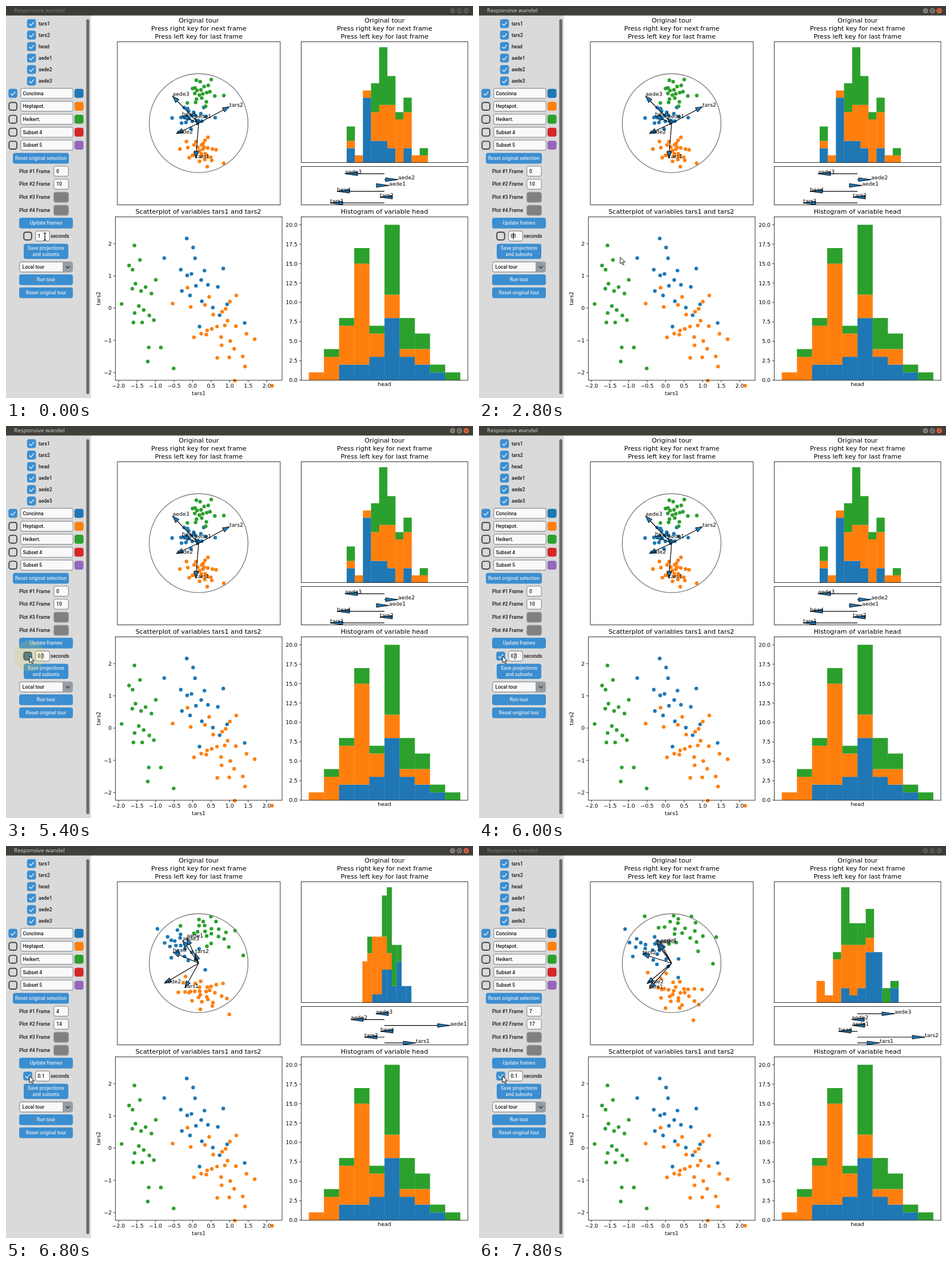
These frames come from a looping animation (817 by 685 pixels, 8000 ms). An HTML page:

```html
<!DOCTYPE html>
<html lang="en">
<head>
<meta charset="utf-8">
<title>Tour window</title>
<style>
html, body { margin: 0; width: 100%; height: 100%; overflow: hidden; background: #fff; }
svg { display: block; width: 817px; height: 685px; }
text { white-space: pre; }
.ui { font: 500 8.6px Roboto, sans-serif; fill: #1a1a1a; }
.ui.btn { fill: #dce4ee; }
.plot { font: 9.35px "DejaVu Sans", sans-serif; fill: #000; }
.plot.head { font-size: 11.2px; }
.bar { font: 9.6px "Open Sans", sans-serif; letter-spacing: .2px; }
</style>
</head>
<body>
<svg viewBox="0 0 817 685">
  <g id="fixed"></g>
  <g id="tour"></g>
  <g id="live"></g>
</svg>
<script>
const BLUE = '#1f77b4', ORANGE = '#ff7f0e', GREEN = '#2ca02c';
const COLORS = [BLUE, ORANGE, GREEN];
const SIZES = [21, 31, 22];
const ACCENT = '#3b8ed0', HOVER = '#36719f', EDGE = '#979da2';
const LOOP = 8000;
const VARS = ['tars1', 'tars2', 'head', 'aede1', 'aede2', 'aede3'];

// Per species: centre x, y, spread x, y, correlation
const SCATTER = [[341, 487, 28, 46, .5], [375, 566, 34, 43, .5], [239, 519, 20, 58, .6]];

// Bar heights per species
const HEAD_BINS = [[0,0,2,2,3,8,3,2,1,0], [1,3,5,13,3,3,1,2,0,0], [0,1,1,2,1,9,4,2,1,1]];

// Key poses; the steps between them are interpolated
const POSES = [
  { step: 0, span: [596, 738],
    clouds: [[325, 194, 15, 11, 0], [341, 254, 15, 13, .2], [343, 151, 14, 13, 0]],
    axes: [[332, 266], [391, 176], [308, 192], [330, 196], [298, 223], [291.5, 157.5]],
    tips: [567, 654, 579, 670, 686, 593],
    bins: [[2,0,9,3,3,2,0,2,0,0], [1,1,1,4,5,6,6,5,1,1], [2,0,0,4,8,4,1,2,0,1]] },
  { step: 4, span: [623.5, 709],
    clouds: [[304, 176, 18, 18, .5], [342, 256, 24, 15, .3], [359, 150, 24, 17, .5]],
    axes: [[313, 248], [331, 187], [292, 185.5], [316, 160.5], [277, 240], [309, 165]],
    tips: [717, 627, 655, 777, 603, 647],
    bins: [[0,0,1,1,4,4,2,5,2,2], [5,6,7,7,4,2,0,0,0,0], [0,2,0,0,5,8,5,2,0,0]] },
  { step: 7, span: [590.5, 734],
    clouds: [[300, 183, 24, 18, .5], [343, 256, 24, 17, .35], [357, 149, 29, 21, .5]],
    axes: [[298, 249.5], [286, 189], [311, 170], [317, 168], [294, 240.5], [314, 170]],
    tips: [701, 780, 629, 653, 652, 727],
    bins: [[0,0,0,2,1,2,7,7,0,2], [3,1,6,6,7,6,2,0,0,0], [0,0,1,8,3,3,4,0,2,1]] }
];

const $ = id => document.getElementById(id);
const range = n => [...Array(n).keys()];
const within = (t, ...spans) => spans.some(([a, b]) => t >= a && t < b);
const mix = (p, q, k) => Array.isArray(p) ? p.map((v, i) => mix(v, q[i], k)) : p + (q - p) * k;

function seeded(seed) {
  return () => (seed = (seed * 16807) % 2147483647) / 2147483647;
}

// Evenly spread normal samples as [radius, angle]
const random = seeded(4711);
const SAMPLES = SIZES.map(n => range(n).map(i =>
  [Math.sqrt(-2 * Math.log((i + .5) / n)), i * 2.4 + random()]));

const rect = (x, y, w, h, fill, more = '') =>
  `<rect x="${x}" y="${y}" width="${w}" height="${h}" fill="${fill}" ${more}/>`;
const path = (d, stroke, width, more = 'fill="none"') =>
  `<path d="${d}" stroke="${stroke}" stroke-width="${width}" ${more}/>`;
const dot = (x, y, r, fill, more = '') => `<circle cx="${x}" cy="${y}" r="${r}" fill="${fill}" ${more}/>`;
const text = (x, y, s, cls, anchor = 'start', more = '') =>
  `<text x="${x}" y="${y}" class="${cls}" text-anchor="${anchor}" ${more}>${s}</text>`;
const ui = (x, y, s) => text(x, y + 3, s, 'ui');
const frame = (x, y, w, h) => rect(x, y, w, h, 'none', 'stroke="#000" stroke-width=".8"');

const button = (x, y, w, h, lines, fill = ACCENT) => rect(x, y, w, h, fill, 'rx="4"') +
  lines.map((s, i) => text(x + w / 2, y + h / 2 + 3 + (i - (lines.length - 1) / 2) * 11.5, s,
    'ui btn', 'middle')).join('');

const entry = (x, y, w, fill = '#f9f9fa') =>
  rect(x + .7, y - 8.8, w - 1.4, 17.6, fill, `rx="3.5" stroke="${EDGE}" stroke-width="1.4"`);

function check(x, y, on, fill = 'none') {
  if (!on) return rect(x + 1, y - 6.8, 13.6, 13.6, fill, 'rx="3.5" stroke="#3e454a" stroke-width="1.9"');
  return rect(x, y - 7.8, 15.6, 15.6, ACCENT, 'rx="4"') +
    path(`M${x + 3.8} ${y + .3}l3 3.1l5.2 -6.2`, '#e6edf5', 1.4);
}

// Each species is a tilted normal cloud; spin turns the samples inside it
function clouds(shapes, spin = 0) {
  return shapes.map(([cx, cy, sx, sy, tilt], k) => SAMPLES[k].map(([r, a]) => {
    const u = r * Math.cos(a + spin), v = r * Math.sin(a + spin);
    return dot(cx + sx * u, cy + sy * (tilt * u + Math.sqrt(1 - tilt * tilt) * v), 3.2, COLORS[k]);
  }).join('')).join('');
}

function histogram(bins, [x0, x1], base, unit) {
  const w = (x1 - x0) / bins[0].length;
  return bins[0].map((_, i) => {
    let y = base;
    return bins.map((counts, k) => {
      const h = counts[i] * unit;
      y -= h;
      return h ? rect(x0 + i * w, y, w + .2, h, COLORS[k]) : '';
    }).join('');
  }).join('');
}

function arrow(x0, y0, x1, y1, len, half) {
  const d = Math.hypot(x1 - x0, y1 - y0) || 1, ux = (x1 - x0) / d, uy = (y1 - y0) / d;
  const bx = x1 - ux * len, by = y1 - uy * len;
  return path(`M${x0} ${y0}L${x1} ${y1}`, '#000', 1.2) +
    path(`M${x1} ${y1}L${bx - uy * half} ${by + ux * half}L${bx + uy * half} ${by - ux * half}Z`,
      '#000', .9, `fill="${BLUE}"`);
}

function drawPanel() {
  let s = rect(0, 16, 148.5, 669, '#dadada');
  VARS.forEach((v, i) => { s += check(36.8, 30.8 + 20.06 * i, true) + ui(57, 30.8 + 20.06 * i, v); });

  const swatches = [...COLORS, '#d62728', '#9467bd'];
  ['Concinna', 'Heptapot.', 'Heikert.', 'Subset 4', 'Subset 5'].forEach((name, i) => {
    const y = 152.6 + 22.65 * i;
    s += check(4.3, y, i === 0) + entry(25, y, 93) + ui(29.5, y, name) +
      rect(119.8, y - 7.8, 15.8, 15.6, swatches[i], 'rx="4"');
  });

  s += button(12, 256.7, 98, 18.8, ['Reset original selection']);
  range(4).forEach(i => {
    const y = 288.7 + 22.75 * i;
    s += ui(23, y, `Plot #${i + 1} Frame`) + entry(83, y, 27, i < 2 ? '#f9f9fa' : '#808080');
  });
  s += button(23, 370, 94, 18.8, ['Update frames']) + ui(78, 402, 'seconds');
  s += entry(23, 456, 94) + path('M99 447.2h14a4 4 0 0 1 4 4v9.6a4 4 0 0 1 -4 4h-14Z', 'none', 0, `fill="${EDGE}"`) +
    path('M104.5 454.5l3.5 3.5l3.5 -3.5', '#333', 1.3) + ui(28.5, 456, 'Local tour');
  return s + button(23, 469, 94, 18.8, ['Run tour']) + button(23, 491.8, 94, 18.8, ['Reset original tour']);
}

function drawPlots() {
  let s = '';
  [337.3, 662.3].forEach(x => {
    ['Original tour', 'Press right key for next frame', 'Press left key for last frame'].forEach((line, i) => {
      s += text(x, 28.5 + 14.2 * i, line, 'plot head', 'middle');
    });
  });
  s += text(336.5, 363, 'Scatterplot of variables tars1 and tars2', 'plot head', 'middle') +
    text(662, 363, 'Histogram of variable head', 'plot head', 'middle');

  const minus = (v, digits) => v.toFixed(digits).replace('-', '\u2212');
  range(9).forEach(i => {
    const x = 196.9 + 32.4 * i, y = 653.8 - 33.94 * i;
    s += path(`M${x} 654v3.4M516.5 ${y}h-3.4`, '#000', .8) +
      text(x, 667.3, minus(-2 + i / 2, 1), 'plot', 'middle') +
      text(510, y + 3.4, (2.5 * i).toFixed(1), 'plot', 'end');
  });
  range(5).forEach(i => {
    const y = 415.3 + 56.3 * i;
    s += path(`M191.3 ${y}h-3.4`, '#000', .8) + text(185, y + 3.4, minus(2 - i, 0), 'plot', 'end');
  });
  s += text(337, 680, 'tars1', 'plot', 'middle') + text(662, 664, 'head', 'plot', 'middle') +
    text(0, 0, 'tars2', 'plot', 'middle', 'transform="translate(165 511) rotate(-90)"');
  s += clouds(SCATTER) + histogram(HEAD_BINS, [529.7, 794.6], 653.8, 13.576);
  return s + frame(191.3, 368.5, 291.7, 285.5) + frame(516.5, 368.5, 291.5, 285.5);
}

function poseAt(step) {
  const i = step < 4 ? 0 : 1, a = POSES[i], b = POSES[i + 1];
  const k = (step - a.step) / (b.step - a.step);
  const pose = {};
  for (const key in a) pose[key] = mix(a[key], b[key], k);
  pose.bins = pose.bins.map(counts => counts.map(Math.round));
  return pose;
}

function drawTour(step) {
  const p = poseAt(step);
  let s = ui(88, 288.7, step) + ui(88, 311.4, step + 10), labels = '';
  s += clouds(p.clouds, step * .1) + dot(337, 204.7, 86.4, 'none', 'stroke="#808080" stroke-width="1.4"');
  VARS.forEach((v, i) => {
    const [x, y] = p.axes[i], row = 344.2 - 10.2 * i;
    s += arrow(337, 204.8, x, y, 12, 4.2) + arrow(662, row, p.tips[i], row, 22, 3.2);
    labels += text(x, y - .5, v, 'plot') + text(p.tips[i], row, v, 'plot');
  });
  const [b, o, g] = p.bins;
  const most = Math.max(...b.map((n, i) => n + o[i] + g[i]));
  s += histogram(p.bins, p.span, 273.5, 201.4 / most) + labels;
  s += frame(194.8, 62.6, 285, 284.8) + frame(516.5, 62.6, 291.5, 210.9) + frame(516.5, 280.4, 291.5, 67);
  $('tour').innerHTML = s;
}

// Pointer keys: time, x, y
const PATH = [[0, 68, 403], [300, 68, 403], [600, 80, 410], [1100, 55, 403], [1500, 55, 403], [1700, 247, 439],
  [3600, 247, 439], [4000, 143, 430], [4400, 52, 415], [4800, 41, 402], [LOOP, 41, 402]];

function pointerAt(t) {
  const i = PATH.findIndex(key => key[0] > t), a = PATH[i - 1], b = PATH[i];
  return mix(a, b, (t - a[0]) / (b[0] - a[0])).slice(1);
}

function pointer(x, y) {
  if (x > 50 && x < 78 && y > 393 && y < 412) {
    const d = `M${x - 2.5} ${y - 6.5}q2.5 0 2.5 1.5q0 -1.5 2.5 -1.5M${x} ${y - 5}v10` +
      `M${x - 2.5} ${y + 6.5}q2.5 0 2.5 -1.5q0 1.5 2.5 1.5`;
    return path(d, '#fff', 2.6) + path(d, '#000', 1.2);
  }
  return path(`M${x} ${y}v11.5l2.7 -2.5l2 4.4l2 -.9l-2 -4.2h3.8Z`, '#111', 1, 'fill="#fff"');
}

function titleBar(focus) {
  const marks = ['M779.3 8.3h4', 'M791.3 6.5h3.6v3.6h-3.6Z', 'M803.5 6.6l3.4 3.4m0 -3.4l-3.4 3.4'];
  return rect(0, 0, 817, 16.6, focus ? '#403f3a' : '#3c3b37') +
    text(14, 11.4, 'Responsive wandel', 'bar', 'start', `fill="${focus ? '#dfdbd2' : '#807d78'}"`) +
    marks.map((d, i) => {
      const fill = !focus ? '#5b5a55' : i === 2 ? '#e8623a' : '#85837b';
      return dot(781.2 + 12 * i, 8.3, 4.6, fill) + path(d, '#3c3b37', 1);
    }).join('');
}

function drawLive(t) {
  const [x, y] = pointerAt(t);
  const overBar = x > 138 && x < 148;
  const overSave = x > 31 && x < 109 && y > 414 && y < 442;
  const overCheck = x < 46 && y < 411;
  const typed = t < 2800 ? '' : t < 2900 ? '0' : '0.';
  const caret = (cx, cy) => path(`M${cx} ${cy - 6}v12`, '#000', 1);

  let s = titleBar(within(t, [1400, 7100])) +
    rect(140.5, 23, 5.2, 655, overBar ? '#535353' : '#696969', 'rx="2.6"') +
    button(31, 415.4, 78, 26.6, ['Save projections', 'and subsets'], overSave ? HOVER : ACCENT) +
    check(30.2, 402, t >= 5900, overCheck ? HOVER : 'none') +
    entry(51, 402, 26) + ui(55.5, 402, typed + '1');

  if (within(t, [300, 900], [1200, 1400])) s += caret(93.3, 311.4);
  if (within(t, [1400, 2000], [2300, 3100], [3300, 3900], [4200, 4800], [5200, 5800], [6000, 6600]))
    s += caret(55.5 + [0, 4.9, 7.4][typed.length], 402);
  if (within(t, [700, 1200], [5200, 6000])) s += dot(x, y, 27, '#d2cd50', 'opacity=".2"');
  $('live').innerHTML = s + pointer(x, y);
}

// The tour advances every 200 ms, with a longer wait before the last step
function stepAt(t) {
  if (t >= 7800) return 7;
  return Math.max(0, Math.min(6, Math.floor((t - 6000) / 200)));
}

let lastTime = -1, lastStep = -1;
function render(now) {
  const t = Math.floor(now % LOOP / 100) * 100;
  const step = stepAt(t);
  if (step !== lastStep) drawTour(lastStep = step);
  if (t !== lastTime) drawLive(lastTime = t);
}

$('fixed').innerHTML = drawPanel() + drawPlots();
render(0);
const start = performance.now();
(function tick() {
  render(performance.now() - start);
  requestAnimationFrame(tick);
})();
</script>
</body>
</html>
```
